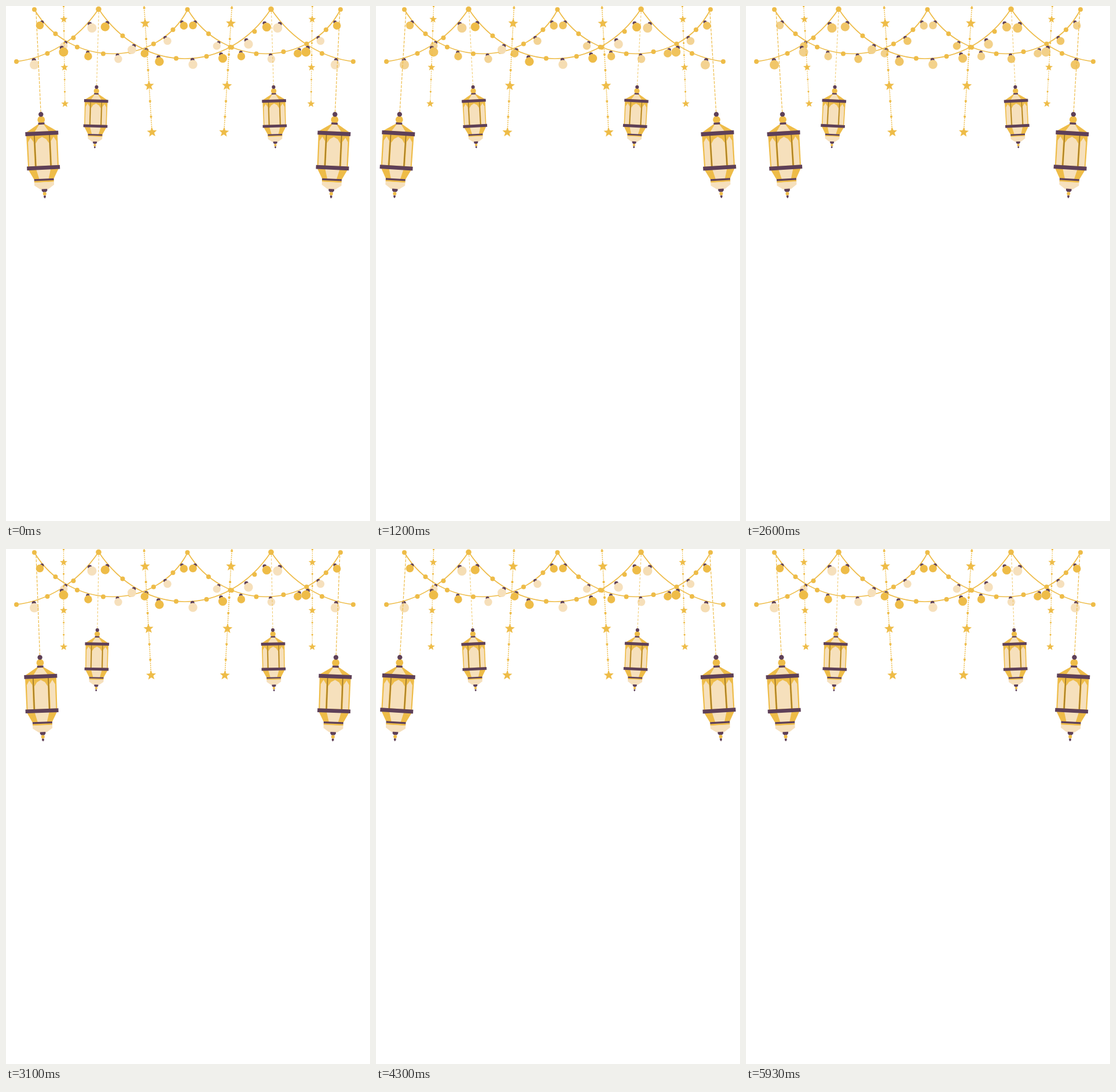
An HTML page with a canvas that plays this animation: 629x890 px, repeating every 6010 ms.

```html
<!DOCTYPE html>
<html>
<head>
<meta charset="utf-8">
<title>Hanging lanterns</title>
<style>
html, body { margin: 0; width: 100%; height: 100%; overflow: hidden; background: #fff; }
canvas { display: block; }
</style>
</head>
<body>
<canvas id="stage" width="629" height="890"></canvas>
<script>
const ctx = document.getElementById('stage').getContext('2d');
const GOLD = '#eebc48', PALE = '#f6e0bc', PLUM = '#5e4058', LINE = '#9a7426';
const LOOP = 6010, SWING = 3000, BLINK = 1500, TAU = Math.PI * 2;

const wave = (t, peak, period) => Math.cos(TAU * (t - peak) / period);

function disc(x, y, r, color) {
  ctx.fillStyle = color;
  ctx.beginPath();
  ctx.arc(x, y, r, 0, TAU);
  ctx.fill();
}

function poly(color, ...pts) {
  ctx.fillStyle = color;
  ctx.beginPath();
  for (let i = 0; i < pts.length; i += 2) ctx.lineTo(pts[i], pts[i + 1]);
  ctx.fill();
}

// Symmetric shape around x = 0, from rows of (half width, y)
function rows(color, ...r) {
  const left = [], right = [];
  for (let i = 0; i < r.length; i += 2) {
    right.push(r[i], r[i + 1]);
    left.unshift(-r[i], r[i + 1]);
  }
  poly(color, ...right, ...left);
}

function star(y, R) {
  const pts = [];
  for (let i = 0; i < 10; i++) {
    const r = i % 2 ? R * 0.43 : R, a = i * TAU / 10;
    pts.push(r * Math.sin(a), y - r * Math.cos(a));
  }
  poly(GOLD, ...pts);
}

function string(from, to, width, dash) {
  ctx.strokeStyle = GOLD;
  ctx.lineWidth = width;
  ctx.setLineDash(dash);
  ctx.beginPath();
  ctx.moveTo(0, from);
  ctx.lineTo(0, to);
  ctx.stroke();
  ctx.setLineDash([]);
}

// Garlands: one spans the outer ends, the other repeats a single swag twice
const wires = new Path2D(
  'M18 96C68 90 122 62 160 5C236 119.7 382 119.7 458 5C496 62 550 90 600 96' +
  'M49 6C110 108 261 108 314 6C375 108 525 108 578 6');
const SWAG = 264.5;
const outerBeads = [[18, 96], [71.5, 82], [116.5, 55], [201.5, 51.5], [243, 77], [294, 90.5],
  [346.5, 87], [390, 71.5], [429.5, 44], [546, 82], [600, 96]];
const swagBeads = [[49, 6], [85.5, 48], [123, 71], [168, 82.5], [215, 79], [255, 65.5], [288.5, 41]];

// Blink groups: time of full glow and bias
const glow = { a: [-90, 0], b: [-10, 0], c: [740, .15], d: [660, .15], e: [720, .25] };
// Bulbs: x, y, radius, lean of the cap, group
const outerBulbs = [
  [49, 101.5, 8, -.1, 'e'], [99.5, 79.5, 7.9, -.4, 'b'], [148.5, 38, 8, -.5, 'e'],
  [171.3, 36, 7.6, .5, 'a'], [217.5, 75.5, 7.4, .5, 'd'], [265, 96, 7.6, -.2, 'a'],
  [323, 101, 7.7, -.1, 'd'], [374.5, 90.5, 7.5, -.4, 'a'], [419, 66, 7.7, -.5, 'd'],
  [450.5, 36.5, 7.6, -.5, 'a'], [469.3, 38, 8, .5, 'e'], [518.3, 79.5, 7.9, .4, 'b'],
  [569, 101.5, 8, .2, 'e']];
const swagBulbs = [
  [58.5, 33.5, 6.7, .6, 'b'], [99.8, 69.2, 6.6, .5, 'c'], [142, 87, 6.7, -.1, 'b'],
  [194, 91.6, 6.8, -.2, 'c'], [239.5, 82, 6.8, .4, 'b'], [279, 60.5, 6.8, -.6, 'c'],
  [307.3, 34, 6.7, -.5, 'b']];

const repeat = list => list.concat(list.map(([x, ...rest]) => [x + SWAG, ...rest]));
const beads = outerBeads.concat(repeat(swagBeads), [[578, 6]]);
const bulbs = repeat(swagBulbs).concat(outerBulbs);

function drawGarlands(t) {
  ctx.strokeStyle = GOLD;
  ctx.lineWidth = 1.7;
  ctx.stroke(wires);
  for (const [x, y] of beads) disc(x, y, 4, GOLD);
  disc(160, 5.5, 4.8, GOLD);
  disc(458, 5.5, 4.8, GOLD);
  for (const [x, y, r, lean, group] of bulbs) {
    const [peak, bias] = glow[group];
    const level = .5 + bias + .9 * wave(t, peak, BLINK);
    disc(x + r * Math.sin(lean), y - r * Math.cos(lean), r * .45, PLUM);
    disc(x, y, r, PALE);
    ctx.globalAlpha = Math.min(1, Math.max(0, level));
    disc(x, y, r, GOLD);
    ctx.globalAlpha = 1;
  }
}

// Lantern with its knob at the origin
function lantern() {
  rows(GOLD, 6, 17, 28, 31);
  rows(PALE, 3.5, 17, 12, 29.5);
  disc(0, 9.3, 6.4, GOLD);
  disc(0, 0, 4.2, PLUM);
  rows(PLUM, 5.5, 14.3, 5.5, 17.6);
  rows(GOLD, 27, 34, 26.5, 92);
  rows(PALE, 0, 39, 7, 43, 11.5, 50, 11.5, 89);
  for (const s of [-1, 1]) {
    poly(PALE, s * 15, 89, s * 15, 47, s * 20, 39.5, s * 24.5, 47, s * 24.5, 89);
    poly(LINE, s * 12.3, 36, s * 13.9, 36, s * 13.9, 90, s * 12.3, 90);
  }
  rows(GOLD, 26, 95, 17, 112);
  rows(PALE, 12.5, 95, 8, 112);
  rows(PLUM, 28.5, 29.5, 28.5, 36.3);
  rows(PLUM, 28.5, 89, 28.5, 95.7);
  rows(GOLD, 17, 114, 17, 117.5);
  rows(PLUM, 17, 111.3, 17, 114.6);
  rows(PALE, 17, 117.2, 17, 122.5, 7, 129.5);
  rows(PLUM, 4.8, 129, 4.8, 132, 2.5, 134.5);
  disc(0, 137.3, 3, GOLD);
  rows(PLUM, 1.8, 140.5, 1.8, 143, 0, 145.5);
}

function hangLantern(from, knob, scale, width, dash) {
  string(from, knob, width, dash);
  ctx.translate(0, knob);
  ctx.scale(scale, scale);
  lantern();
}

function hangStars(ys, gap, R, width) {
  string(0, ys[2], width, [1.8, 1.6]);
  for (let y = ys[2] - gap; y > 0; y -= gap) disc(0, y, R * .23, GOLD);
  for (const y of ys) star(y, R);
}

// Draws a swinging part and its mirror image; the angle is in radians
function pair(x, y, angle, mirrorSum, draw) {
  for (const side of [1, -1]) {
    ctx.save();
    if (side < 0) {
      ctx.translate(mirrorSum, 0);
      ctx.scale(-1, 1);
    }
    ctx.translate(x, y);
    ctx.rotate(-angle);
    draw();
    ctx.restore();
  }
}

function draw(t) {
  ctx.fillStyle = '#fff';
  ctx.fillRect(0, 0, 629, 890);
  drawGarlands(t);
  const swing = peak => wave(t, peak, SWING);
  pair(99.6, 0, .006 + .0605 * swing(2310), 629, () => hangStars([23, 106, 169], 21, 6.8, 1.1));
  pair(238.6, 0, .0075 + .0617 * swing(2780), 629, () => hangStars([30, 138, 218.5], 26.9, 9, 1.6));
  pair(160.5, 5, .002 - .0538 * swing(2550), 618.9, () => hangLantern(5, 135.2, .73, .8, [4, 2.5]));
  pair(51.9, 9, .0624 * swing(2660), 628.8, () => hangLantern(2, 178.5, 1, 1.2, [5, 2]));
}

function tick() {
  const t = performance.now() % LOOP, part = t % 100;
  draw(t - part + (part < 30 ? 0 : 30));
  requestAnimationFrame(tick);
}
tick();
</script>
</body>
</html>
```
